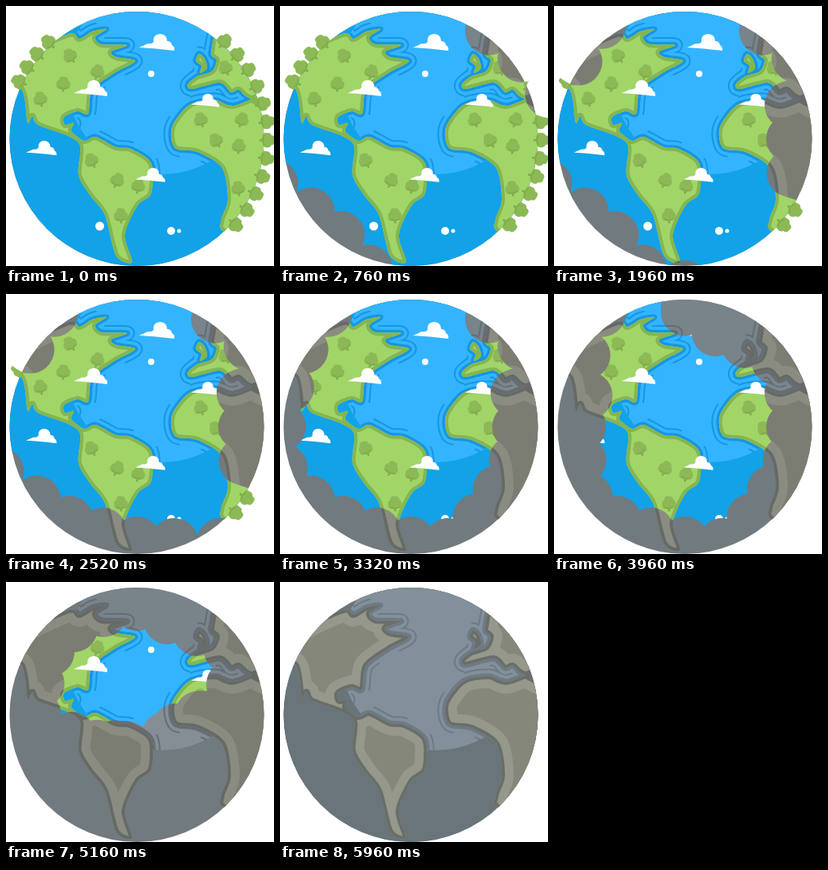
Write an HTML page that moves like this. It is 336 by 326 pixels and loops after 6000 ms.

```html
<!DOCTYPE html>
<html lang="en">
<head>
<meta charset="utf-8">
<title>Greying globe</title>
<style>
html, body { margin: 0; width: 100%; height: 100%; overflow: hidden; background: #fff; }
svg { display: block; width: 336px; height: 326px; }
.alive { --sea: #12a2e8; --lit: #34b4ff; --wave: #1596e2; --land: #a1d568; --core: #a1d568; --rim: #85b551; }
.smog { --sea: #717a7e; --lit: url(#haze); --wave: #646d74; --land: #8b8c81; --core: #7c7d72; --rim: #666a66; }
.ash { --sea: #69757a; --lit: #82909a; --wave: #6d7a86; --land: #95988a; --core: #84877a; --rim: #696e6a; }
.coast { fill: none; stroke-linejoin: round; }
</style>
</head>
<body>
<svg viewBox="0 0 336 326">
  <defs>
    <clipPath id="globe"><circle cx="164" cy="166.5" r="159.5"/></clipPath>
    <clipPath id="bright"><circle cx="196" cy="90" r="121"/></clipPath>
    <clipPath id="shore"><path id="lands"/></clipPath>
    <linearGradient id="haze" gradientUnits="userSpaceOnUse" x1="0" y1="105" x2="0" y2="145">
      <stop stop-color="#78838a"/><stop offset="1" stop-color="#858e95"/>
    </linearGradient>
    <mask id="left" maskUnits="userSpaceOnUse" x="0" y="0" width="336" height="326">
      <rect width="336" height="326" fill="#fff"/>
      <g id="smoke" stroke="#000" stroke-width="60" stroke-linecap="round"></g>
    </mask>
    <g id="world" clip-path="url(#globe)">
      <rect width="336" height="326" style="fill:var(--sea)"/>
      <g clip-path="url(#bright)" class="coast">
        <circle cx="196" cy="90" r="121" style="fill:var(--lit)"/>
        <use href="#lands" style="stroke:var(--wave);stroke-width:19" stroke-dasharray="45 30"/>
        <use href="#lands" style="stroke:var(--lit);stroke-width:15"/>
        <use href="#lands" style="stroke:var(--wave);stroke-width:7"/>
      </g>
      <g clip-path="url(#shore)">
        <use href="#lands" style="fill:var(--core);stroke:var(--land);stroke-width:30"/>
        <use href="#lands" class="coast" style="stroke:var(--rim);stroke-width:8"/>
      </g>
    </g>
    <g id="tree">
      <path d="M-1 5V11H1.5V5Z" fill="#7ca548"/>
      <path d="M-3 8Q-10 8-9 2Q-10-2-6-4Q-6-10 0-9Q6-9 6-4Q10-2 9 3Q8 8 4 7Q1 10-3 8Z" fill="#8cb955"/>
      <path d="M-6 5Q0 9 6 5" fill="none" stroke="#7eaa4b" stroke-width="1.5"/>
    </g>
    <path id="cloud" d="M0 17L11 12Q16 13 18 10Q17 0 27 0Q35 1 35 9Q40 9 41 14Q45 16 44 21Q20 18 0 17Z" fill="#fff"/>
  </defs>
  <use class="smog" href="#world"/>
  <use class="ash" id="ash" href="#world"/>
  <g id="alive" mask="url(#left)">
    <use class="alive" href="#world"/>
    <g id="extras"></g>
  </g>
</svg>
<script>
const $ = id => document.getElementById(id);
const clamp = v => Math.max(0, Math.min(1, v));
const polar = (deg, r) => [164 + r * Math.cos(deg * Math.PI / 180), 166.5 + r * Math.sin(deg * Math.PI / 180)];

// Closed smooth curve that passes through a few key points
function curve(text) {
  const p = text.split(' ').map(s => s.split(',').map(Number));
  const at = i => p[(i + p.length) % p.length];
  const handle = (i, a, b) => at(i).map((v, k) => v + (at(b)[k] - at(a)[k]) / 7);
  return 'M' + p[0] + p.map((_, i) =>
    'C' + [handle(i, i - 1, i + 1), handle(i + 1, i + 2, i), at(i + 1)].join(' ')).join('') + 'Z';
}

const americas = '76,36 92,41 108,32 126,29 112,39 120,48 152,49 132,57 138,64 162,69 136,84 108,105 103,135 90,132 '
  + '73,139 74,149 85,147 82,157 98,169 112,164 138,177 156,179 182,197 182,235 165,250 149,287 158,321 '
  + '138,313 124,262 106,238 91,212 93,176 78,163 40,149 33,138 27,146 20,105 -10,80';
const europe = '275,20 257,58 264,68 258,82 240,88 228,98 233,104 268,96 282,108 292,105 304,115 345,128';
const britain = '242,60 249,66 252,78 243,84 245,75 238,69';
const africa = '345,122 284,125 262,118 230,124 208,152 212,178 240,183 271,203 278,243 270,268 275,284 345,310';
$('lands').setAttribute('d', [americas, europe, britain, africa].map(curve).join(''));

const place = (id, x, y, more = '') => `<use href="#${id}" transform="translate(${x} ${y}) ${more}"/>`;
const groves = [[80, 62], [115, 82], [72, 97], [43, 116], [107, 193], [140, 218], [166, 225], [144, 262],
  [244, 142], [263, 168], [296, 142], [292, 175], [291, 228], [275, 77]];
const clouds = [[167, 35, 1], [85, 93, .95], [25, 169, .87], [162, 203, .85], [232, 110, .8]];
const dots = [[182, 85, 4], [117.5, 276, 5.5], [207, 282, 5], [217, 282, 2.5]];

let extras = groves.map(([x, y], i) => place('tree', x, y, `rotate(${i * 47 % 60 - 30}) scale(.95)`)).join('');
const treeRow = (from, to, step) => {
  for (let a = from; a <= to; a += step) extras += place('tree', ...polar(a, 165), `rotate(${a + 90})`);
};
treeRow(-154, -132, 7.2);
treeRow(-48, 42, 8.1);
extras += clouds.map(([x, y, s]) => place('cloud', x, y, `scale(${s})`)).join('');
extras += dots.map(([x, y, r]) => `<circle cx="${x}" cy="${y}" r="${r}" fill="#fff"/>`).join('');
$('extras').innerHTML = extras;

// Smoke presses inward along round-tipped spokes.
// Each surge: start time, direction, half width in degrees, distance kept from the centre.
const OUTSIDE = 184, END = 5760;
const surges = [
  [0, -42, 34, 137], [380, 135, 34, 121], [760, -138, 20, 136], [1140, -5, 37, 102],
  [1520, 100, 56, 113], [2520, 38, 45, 106], [3040, 178, 52, 100], [3500, -60, 45, 99],
  [3960, -118, 52, 100], [4360, 80, 120, 14], [5160, 0, 999, 0]
];
const spokes = Array.from({ length: 20 }, (_, i) => {
  const line = document.createElementNS('http://www.w3.org/2000/svg', 'line');
  $('smoke').append(line);
  return { line, angle: i * 18, jitter: 5 * Math.sin(i * 5) };
});

function reach(angle, t) {
  return Math.min(OUTSIDE, ...surges.map(([start, direction, half, kept], i) => {
    const end = i + 1 < surges.length ? surges[i + 1][0] : END;
    const turn = Math.abs((angle - direction + 540) % 360 - 180);
    const bulge = 1 - Math.min(1, turn / half) ** 4;
    return OUTSIDE - (OUTSIDE - kept) * bulge * clamp((t - start) / (end - start));
  }));
}

function setEnds(line, [x1, y1], [x2, y2]) {
  for (const [name, value] of Object.entries({ x1, y1, x2, y2 })) line.setAttribute(name, value);
}

function draw(now) {
  const t = Math.floor(now % 6000 / 40) * 40;
  for (const { line, angle, jitter } of spokes) {
    const tip = reach(angle, t);
    const wobble = tip < OUTSIDE ? jitter : 0;
    setEnds(line, polar(angle, tip + 30 + wobble), polar(angle, 280));
  }
  $('alive').style.display = t >= END ? 'none' : '';
  $('ash').style.opacity = clamp((t - END) / 200);
}

const begin = performance.now();
(function loop() {
  draw(performance.now() - begin);
  requestAnimationFrame(loop);
})();
</script>
</body>
</html>
```
